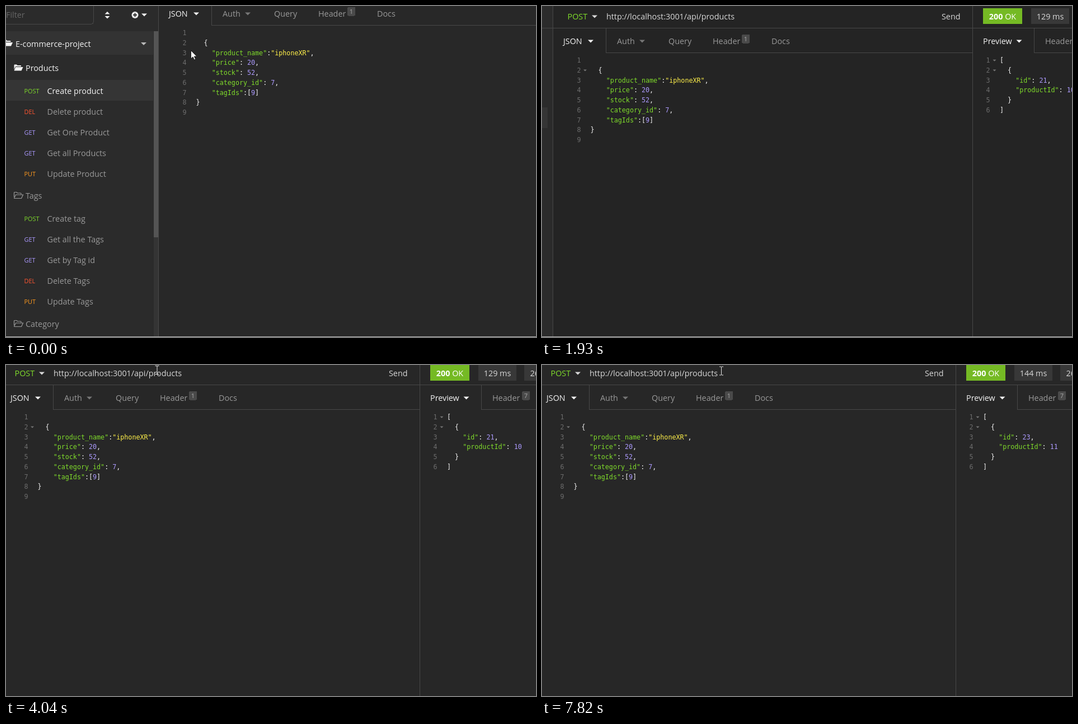
These frames come from a looping animation (947x591 px, 8 s). An HTML page:

```html
<!DOCTYPE html>
<html lang="en">
<head>
<meta charset="utf-8">
<title>API client</title>
<style>
  html, body { margin: 0; width: 100%; height: 100%; overflow: hidden; background: #262626; }
  svg { display: block; width: 947px; height: 591px; }
  rect { shape-rendering: crispEdges; }
  text { font: 14.35px "Open Sans", "Noto Sans", sans-serif; white-space: pre; }
  .method { font-size: 10.9px; }
  .code { font: 11.7px "DejaVu Sans Mono", monospace; }
  .badge { font-size: 11px; }
</style>
</head>
<body>
<svg id="stage" viewBox="0 0 947 591"></svg>
<script>
const COLOR = {
  text: '#f4f4f4', soft: '#d8d8d8', dim: '#999999', line: '#484848',
  POST: '#7fdb2b', DEL: '#ff5631', GET: '#ac9aff', PUT: '#ff9a1f', string: '#fff04a'
};

// Drawing helpers return SVG markup; text is placed by its vertical middle.
const label = (x, mid, text, fill = COLOR.dim, extra = '') =>
  `<text x="${x}" y="${mid + 5}" fill="${fill}" ${extra}>${text}</text>`;
const rect = (x, y, w, h, fill, extra = '') =>
  `<rect x="${x}" y="${y}" width="${w}" height="${h}" fill="${fill}" ${extra}/>`;
const hline = (x1, x2, y) => rect(x1, y, x2 - x1, 1, COLOR.line);
const vline = (x, y1, y2) => rect(x, y1, 1, y2 - y1, COLOR.line);
const caret = (x, mid, fill, w = 10) =>
  `<path d="M${x} ${mid - w / 4}h${w}l${-w / 2} ${w / 2}z" fill="${fill}"/>`;
const group = (id, content, extra = '') => `<g id="${id}" ${extra}>${content}</g>`;

function folder(x, mid, open) {
  const paint = open ? `fill="${COLOR.text}"` : `fill="none" stroke="${COLOR.dim}" stroke-width="1.2"`;
  const back = `<path d="M0 9V1.5Q0 .5 1 .5H4.5L6 2H11.5Q12.5 2 12.5 3V4.5" fill="${open ? COLOR.text : 'none'}" stroke="${open ? 'none' : COLOR.dim}" stroke-width="1.2"/>`;
  const front = `<path d="M0 11L3 5H16L13 11.5H.5Z" ${paint}/>`;
  const gap = open ? '<path d="M.3 9.8L2.6 4.5H12.8" fill="none" stroke="#2c2c2c"/>' : '';
  return `<g transform="translate(${x} ${mid - 7})">${back}${gap}${front}</g>`;
}

function highlight(line) {
  const tokens = line.match(/"[^"]*"(?=:)|"[^"]*"|\d+|[^"\d]+/g) || [];
  let end = 0;
  return tokens.map(token => {
    end += token.length;
    const fill = token[0] === '"' ? (line[end] === ':' ? COLOR.POST : COLOR.string)
      : /\d/.test(token) ? COLOR.GET : COLOR.text;
    return `<tspan fill="${fill}">${token}</tspan>`;
  }).join('');
}

const rowY = i => 93.3 + i * 17.72;
const editor = (x, numberX, lines) => lines.map((line, i) =>
  `<text class="code" x="${numberX}" y="${rowY(i) + 4}" text-anchor="end" fill="#6c6c6c">${i + 1}</text>` +
  `<text class="code" x="${x}" y="${rowY(i) + 4}">${highlight(line)}</text>`).join('');
const fold = (x, row) => caret(x, rowY(row), '#777777', 6);

const counter = (x, n) => rect(x, 47, 14, 15.5, '#4a4a4a', 'rx="2"') +
  label(x + 7, 54, n, '#aaaaaa', 'class="badge" text-anchor="middle"');

function sidebar() {
  const folders = [
    ['Products', 111, true, [['POST', 'Create product'], ['DEL', 'Delete product'],
      ['GET', 'Get One Product'], ['GET', 'Get all Products'], ['PUT', 'Update Product']]],
    ['Tags', 339, false, [['POST', 'Create tag'], ['GET', 'Get all the Tags'],
      ['GET', 'Get by Tag id'], ['DEL', 'Delete Tags'], ['PUT', 'Update Tags']]],
    ['Category', 568, false, []]
  ];
  const hover = rect(-40, 45, 303, 42, '#333333') + caret(241, 67.5, '#bbbbbb') +
    rect(264, 45, 8, 600, '#343434') + rect(264, 45, 8, 368, '#555555');
  let out = rect(-300, -60, 572, 720, '#2b2b2b') +
    rect(-40, -40, 196, 72, 'none', `stroke="${COLOR.line}" rx="3"`) +
    label(0, 16, 'Filter', '#666666') +
    `<path d="M176.5 14.5h9l-4.5-4.5zM176.5 18h9l-4.5 4.5z" fill="${COLOR.text}"/>` +
    `<circle cx="230.5" cy="16" r="6" fill="${COLOR.text}"/>` +
    '<path d="M227 16h7M230.5 12.5v7" stroke="#2c2c2c" stroke-width="2"/>' +
    caret(242, 16, COLOR.text) +
    group('sidebarHover', hover) +
    folder(-4, 67, true) + label(17, 67.5, 'E-commerce-project', COLOR.text) +
    rect(-40, 132, 303, 36.5, '#353535');
  for (const [name, y, open, items] of folders) {
    out += folder(14.5, y, open) + label(35, y, name, open ? COLOR.text : COLOR.dim);
    items.forEach(([method, title], i) => {
      const mid = y + 40.5 + i * 37;
      out += label(32.5, mid - .5, method, COLOR[method], 'class="method"') +
        label(73.5, mid, title, open && i === 0 ? COLOR.text : COLOR.dim);
    });
  }
  return out;
}

function requestPane() {
  const json = ['', '  {', '    "product_name":"iphoneXR",', '    "price": 20,', '    "stock": 52,',
    '    "category_id": 7,', '    "tagIds":[9]', '}', ''];
  return group('sendHover', rect(663, 0, 76, 35, '#2b2b2b')) +
    label(15.5, 15, 'POST', COLOR.POST) + caret(59, 15, COLOR.soft) +
    label(85, 14.5, 'http://localhost:3001/api/products', COLOR.soft) +
    label(684, 14.5, 'Send', COLOR.soft) +
    label(8, 59, 'JSON', COLOR.text) + caret(52, 59, COLOR.text) +
    label(104, 59, 'Auth') + caret(144, 59, '#777777') +
    label(196, 59, 'Query') + label(275, 59, 'Header') + counter(327, 1) + label(380, 59, 'Docs') +
    vline(84, 36, 79) + hline(84, 739, 79) +
    editor(56.5, 39.5, json) + group('requestFold', fold(44, 1));
}

const response = (id, time, rowId, productId) => group(id,
  label(878, 14.5, `${time} ms`, COLOR.soft, 'text-anchor="middle"') +
  editor(788, 770.5, ['[', '  {', `    "id": ${rowId},`, `    "productId": ${productId}`, '  }', ']']));

function responsePane() {
  return rect(758, 0, 70, 28, '#75ba24') +
    label(793, 14.5, '<tspan font-weight="bold">200</tspan> OK', '#ffffff', 'text-anchor="middle"') +
    rect(844, 0, 68, 28, '#383838') + rect(926, 0, 70, 28, '#383838') +
    label(936.5, 14.5, '26 B', COLOR.soft) +
    label(758, 59, 'Preview', COLOR.text) + caret(817.5, 59, COLOR.text) +
    label(869, 59, 'Header') + counter(922, 7) +
    vline(849, 36, 79) + hline(849, 1200, 79) +
    response('before', 129, 21, 10) + response('after', 144, 23, 11) +
    fold(775.5, 0) + group('responseFold', fold(775.5, 1));
}

const arrowPath = 'M.5 .5V15L4 11.8L6.3 17L8.6 16L6.3 11H10.8Z';
const beamPath = 'M-3.5 -7.5H-1L0 -7L1 -7.5H3.5M0 -7V7M-3.5 7.5H-1L0 7L1 7.5H3.5';

document.getElementById('stage').innerHTML =
  rect(0, 0, 947, 591, '#262626', 'id="backdrop"') +
  group('world',
    group('sidebar', sidebar(), 'transform="translate(-283 45)"') +
    requestPane() + responsePane() +
    label(-111, 14.5, 'Cookies', COLOR.text) +
    hline(-600, 1200, -8) + hline(-600, 1200, 35) +
    vline(-11, -8, 700) + vline(739, -8, 700)) +
  rect(0, 590, 947, 1, '#b8b8b8', 'id="bottomEdge"') +
  rect(946, 0, 1, 591, '#b8b8b8', 'id="rightEdge"') +
  group('cursor',
    `<path id="arrow" d="${arrowPath}" fill="#fff" stroke="#111" stroke-width=".8"/>` +
    `<path id="beam" d="${beamPath}" fill="none" stroke="#e8e8e8"/>`);

// Pointer moves: start time, number of steps, destination, shape.
const STEP = 120;
const moves = [
  [0, 1, 330, 79, 'arrow'], [120, 5, 463, 43, 'beam'], [740, 4, 432, -20, 'arrow'],
  [2700, 1, 283, 36, 'arrow'], [2840, 3, 244.5, 6.5, 'beam'], [3200, 2, 310, 8, 'beam'],
  [3470, 1, 297, 8, 'beam'], [3620, 1, 294, 9, 'beam'], [3770, 2, 322, 13, 'beam'],
  [4040, 1, 270, 9, 'beam'], [4190, 1, 240, 33, 'arrow'], [4330, 1, 363, 18, 'beam'],
  [4480, 1, 628, 24, 'beam'], [4600, 1, 629, 87, 'beam'], [4900, 3, 701.5, 13, 'arrow'],
  [6230, 1, 701.5, 17, 'arrow'], [6380, 2, 741, 214, 'arrow'], [6640, 1, 451, 189, 'beam'],
  [6760, 1, 361, 150, 'beam'], [6900, 1, 360, 149, 'beam'], [7160, 1, 337, 42, 'arrow'],
  [7300, 4, 320.5, 13, 'beam'], [7820, 1, 320.5, 10.5, 'beam']
];
// Camera offsets: start time, x, y.
const cameraStops = [[0, 283, -45], [1810, 113.5, 8], [1930, 30, 4], [2050, 0, 1], [2170, 0, 0]];

const $ = id => document.getElementById(id);
const show = (id, visible) => { $(id).style.display = visible ? '' : 'none'; };
const place = (id, x, y) => $(id).setAttribute('transform', `translate(${x} ${y})`);
const between = (t, from, to) => t >= from && t < to;

function pointerAt(t) {
  const index = moves.findLastIndex(move => move[0] <= t);
  const [start, steps, x, y, shape] = moves[index];
  const [, , fromX, fromY] = moves[Math.max(0, index - 1)];
  const p = Math.min(1, (Math.floor((t - start) / STEP) + 1) / steps);
  return { x: fromX + (x - fromX) * p, y: fromY + (y - fromY) * p, shape };
}

function draw(t) {
  const [, cameraX, cameraY] = cameraStops.findLast(stop => stop[0] <= t);
  place('world', cameraX, cameraY);
  $('backdrop').setAttribute('fill', t < 1810 ? '#282828' : t < 2170 ? '#242424' : t < 4040 ? '#262626' : '#272727');
  $('sidebarHover').setAttribute('opacity', Math.max(0, 1 - Math.floor(t / STEP) / 5));
  show('bottomEdge', t < 1810 || between(t, 1930, 2170));
  show('rightEdge', between(t, 1810, 1930));
  show('requestFold', t >= 120);
  show('responseFold', !between(t, 5700, 6640));
  show('before', t < 5700);
  show('after', t >= 5700);
  show('sendHover', between(t, 5020, 6380));

  const pointer = pointerAt(t);
  place('cursor', pointer.x, pointer.y);
  show('cursor', !between(t, 1100, 2700));
  show('arrow', pointer.shape === 'arrow');
  show('beam', pointer.shape === 'beam');
}

function tick() {
  draw(performance.now() % 8000);
  requestAnimationFrame(tick);
}
tick();
</script>
</body>
</html>
```
